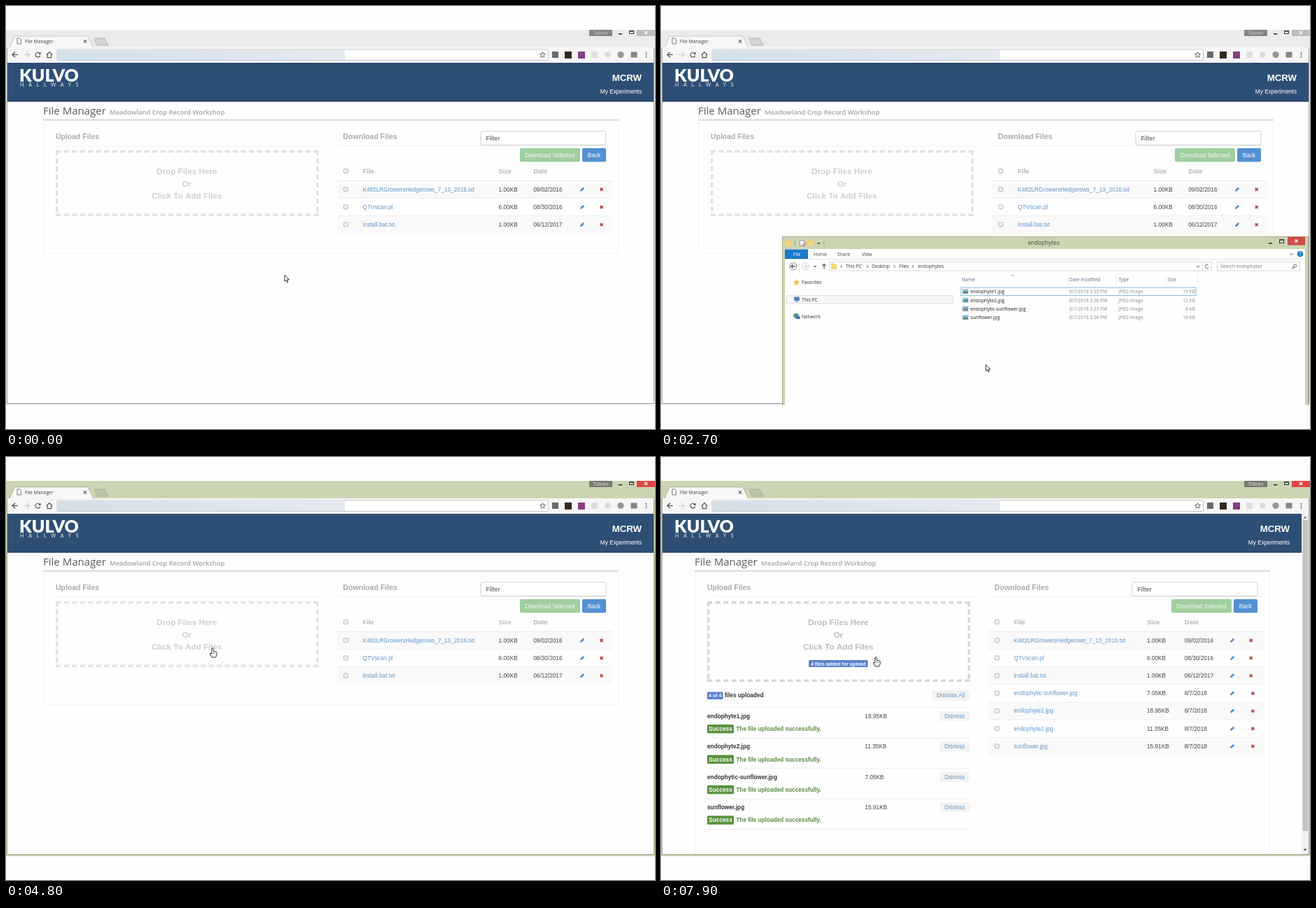
Recreate the animation shown at these times as an HTML page with a canvas. Size 927 by 604 pixels, loop 8000 ms.

```html
<!DOCTYPE html>
<html lang="en">
<head>
<meta charset="utf-8">
<title>File Manager</title>
<style>
html, body { margin: 0; width: 100%; height: 100%; overflow: hidden; background: #fefefe; }
canvas { display: block; }
</style>
</head>
<body>
<canvas id="stage" width="927" height="604"></canvas>
<script>
const g = document.getElementById('stage').getContext('2d');
const ARIAL = '"Liberation Sans", Arial, sans-serif';
const OPEN = '"Open Sans", sans-serif';
const LATO = 'Lato, sans-serif';
const LOOP = 8000, STEP = 100;
const OPENED = 1300, DRAG = 3700, DROP = 4600, LISTED = 5500, DONE = 6100;
const LINK = '#6297ca', GREEN = '#ccd5b3', BADGE = '#5c80d2';

// Pointer path: time, x, y
const PATH = [
  [200, 398, 384], [800, 387, 562], [900, 387, 580], [1900, 440, 580],
  [2600, 464, 512], [2800, 464, 512], [3200, 457.5, 411], [3400, 456, 405],
  [3600, 462, 412], [DRAG, 462, 412], [4300, 322, 297], [DROP, 295, 273],
  [6400, 295, 273], [7200, 307, 286]
];

const FILES = [
  ['K482LRGrowersHedgerows_7_13_2016.txt', '1.00KB', '09/02/2016'],
  ['QTVscan.pl', '6.00KB', '08/30/2016'],
  ['install.bat.txt', '1.00KB', '06/12/2017'],
  ['endophytic-sunflower.jpg', '7.05KB', '8/7/2018'],
  ['endophyte1.jpg', '18.95KB', '8/7/2018'],
  ['endophyte2.jpg', '11.35KB', '8/7/2018'],
  ['sunflower.jpg', '15.91KB', '8/7/2018']
];
const UPLOADS = [FILES[4], FILES[5], FILES[3], FILES[6]];
const FOLDER = [
  ['endophyte1.jpg', 35, 19], ['endophyte2.jpg', 36, 12],
  ['endophytic-sunflower.jpg', 37, 8], ['sunflower.jpg', 36, 16]
];

function rect(x, y, w, h, fill, stroke) {
  if (fill) { g.fillStyle = fill; g.fillRect(x, y, w, h); }
  if (stroke) {
    g.strokeStyle = stroke; g.lineWidth = 1;
    g.strokeRect(x + .5, y + .5, w - 1, h - 1);
  }
}
function round(x, y, w, h, r, fill, stroke) {
  g.beginPath(); g.roundRect(x, y, w, h, r);
  if (fill) { g.fillStyle = fill; g.fill(); }
  if (stroke) { g.strokeStyle = stroke; g.lineWidth = 1; g.stroke(); }
}
function poly(pts, fill, stroke, width = 1) {
  g.beginPath();
  for (let i = 0; i < pts.length; i += 2) g.lineTo(pts[i], pts[i + 1]);
  if (fill) { g.closePath(); g.fillStyle = fill; g.fill(); }
  if (stroke) { g.strokeStyle = stroke; g.lineWidth = width; g.stroke(); }
}
function disc(x, y, r, fill, stroke, width = 1, a = 0, b = 7) {
  g.beginPath(); g.arc(x, y, r, a, b);
  if (fill) { g.fillStyle = fill; g.fill(); }
  if (stroke) { g.strokeStyle = stroke; g.lineWidth = width; g.stroke(); }
}
function cross(x, y, r, color, width) {
  poly([x - r, y - r, x + r, y + r], null, color, width);
  poly([x + r, y - r, x - r, y + r], null, color, width);
}
// y is the middle of the capitals
function text(s, x, y, size, color, font = ARIAL, weight = 400, align = 'left') {
  g.font = `${weight} ${size}px ${font}`;
  g.textAlign = align;
  g.fillStyle = color;
  g.fillText(s, x, y + size * .36);
}
const bold = (s, x, y, size, color, align) => text(s, x, y, size, color, ARIAL, 700, align);
const ui = (s, x, y, color = '#333', align = 'left') => text(s, x, y, 6.7, color, OPEN, 400, align);

function badge(s, x, y, w, h, size, color) {
  round(x, y - h / 2, w, h, 1.5, color);
  bold(s, x + w / 2, y, size, '#fff', 'center');
}
function button(s, x, y, w, h, fill, color) {
  round(x, y, w, h, 2, fill);
  text(s, x + w / 2, y + h / 2, 8.25, color, ARIAL, 400, 'center');
}

function drawBrowser(active) {
  const bar = active ? GREEN : '#ebebeb';
  rect(0, 34, 927, 536, bar);
  poly([5, 60, 12, 43, 117, 43, 125, 60], '#f7f7f7', active ? '#a3aa90' : '#bbb', .8);
  poly([126, 46, 141, 46, 146, 56, 130, 56], active ? '#bcc4a5' : '#d5d5d5', '#a9a9a9', .8);
  rect(2, 59, 923, 22, '#f6f6f6');
  poly([16, 46, 19.5, 46, 21.5, 48.2, 21.5, 54, 16, 54, 16, 46], '#fff', '#666', .9);
  text('File Manager', 27, 50.5, 6.8, '#444', OPEN);
  cross(113, 50.5, 2.1, '#555', 1.1);

  rect(833, 34, 33, 9, active ? '#777c6c' : '#858585');
  text('Tobren', 849.5, 38.3, 6.6, active ? '#eee' : '#ccc', OPEN, 400, 'center');
  rect(875, 39, 5, 1.6, '#333');
  rect(890, 35, 7, 5, null, '#333');
  rect(890, 35, 7, 1.6, '#333');
  rect(901, 34, 26, 9, active ? '#df4746' : '#bdbdbd');
  cross(914, 38, 2, '#fff', 1.2);

  const dark = '#505050', pale = '#cfcfcf';
  for (const [x, d, c] of [[13, -1, dark], [29.5, 1, pale]]) {
    poly([x - 4, 69.5, x + 4, 69.5], null, c, 1.2);
    poly([x, 65.8, x + 4 * d, 69.5, x, 73.2], null, c, 1.2);
  }
  disc(45.5, 69.7, 3.4, null, dark, 1.2, .3, 5.6);
  poly([49.6, 65.4, 49.6, 69, 46, 69], dark);
  poly([57.8, 70, 62, 65.6, 66.2, 70], null, dark, 1.2);
  poly([59.2, 69.5, 59.2, 73.6, 64.8, 73.6, 64.8, 69.5], null, dark, 1.2);

  round(73, 62, 701.5, 15.5, 1, '#fff', '#c9c9c9');
  const blur = g.createLinearGradient(73, 0, 484, 0);
  blur.addColorStop(0, '#d3e0ea');
  blur.addColorStop(.5, '#dbe4ed');
  blur.addColorStop(1, '#e5ebf1');
  rect(74, 63, 410, 14, blur);
  const star = [];
  for (let i = 0; i <= 10; i++) {
    const r = i % 2 ? 1.8 : 4.2, a = i * Math.PI / 5;
    star.push(766.5 + r * Math.sin(a), 69.8 - r * Math.cos(a));
  }
  poly(star, null, '#555', .9);
  rect(780, 65, 9, 9, '#666b70');
  rect(798, 65, 10, 10, '#34291f');
  rect(817, 65, 10, 10, '#82407f');
  rect(836, 65, 9, 9, '#dedede');
  disc(859.5, 69.5, 4.3, '#dcdcdc');
  disc(878, 69.5, 4.6, '#969696');
  rect(892.5, 65.5, 9, 8, '#858585');
  for (let i = -1; i < 2; i++) disc(914.5, 69.7 + i * 3, .9, dark);

  rect(2, 80, 923, 487, '#fefefe');
  const edge = active ? '#9ba389' : '#a0a0a0';
  rect(1, 60, 1, 508, edge);
  rect(1, 567, 925, 1, edge);
  rect(925, 60, 1, 508, edge);
}

function drawDropZone(x, h, strong) {
  const color = strong ? '#d6d6d6' : '#e2e2e2', ink = strong ? '#bcbcbc' : '#cfcfcf';
  const r = x + 375.5, b = 206 + h;
  g.setLineDash([7.3, 4.2]);
  for (const y of [207.7, b - 1.7]) poly([x, y, r, y], null, color, 3.4);
  for (const e of [x + 1.7, r - 1.7]) poly([e, 206, e, b], null, color, 3.4);
  g.setLineDash([]);
  ['Drop Files Here', 'Or', 'Click To Add Files'].forEach((s, i) =>
    bold(s, x + 187.3, 236 + i * 17.6, 11.7, ink, 'center'));
}

function drawTable(listed) {
  const [left, box, name, size, date, pen] = listed
    ? [467.5, 480, 504, 694, 747.7, 816] : [473, 485.3, 509.5, 703.6, 753.2, 823];
  const check = y => round(box - 3, y - 3, 6, 6, 1.2, '#f1f1f1', '#b5b5b5');
  check(235.6);
  bold('File', name, 236, 9.5, '#b6b6b6');
  bold('Size', size, 236, 9.2, '#b6b6b6');
  bold('Date', date, 236, 9.4, '#b6b6b6');
  FILES.slice(0, listed ? 7 : 3).forEach(([file, kb, day], i) => {
    const y = 261.7 + i * 25.2;
    rect(left, y - 12.6, 393, 25.2, i % 2 ? '#fefefe' : '#f9f9f9');
    rect(left, y - 12.9, 393, i ? .7 : 1.3, '#ececec');
    check(y);
    text(file, name, y, 8.25, LINK);
    text(kb, size, y, 8.25, '#444');
    text(day, date, y, 8.25, '#444');
    poly([pen - 3.2, y + 3.2, pen - 2.4, y + .5, pen + 1.2, y - 3, pen + 3.2, y - 1, pen - .5, y + 2.6], '#5a92d2');
    cross(listed ? (i < 3 ? 842.7 : 845.3) : 850.6, y + .2, 1.9, '#b9483f', 1.8);
  });
}

function drawUploads(done) {
  badge('4 files added for upload', 211, 295, 84.5, 10, 7, BADGE);
  badge('4 of 4', 66, 340.7, 22.5, 10.5, 7.1, BADGE);
  bold('files uploaded', 91, 340.5, 8.25, '#333');
  button('Dismiss All', 387, 333, 54, 15, '#f3f3f3', LINK);
  rect(66, 357, 375, .8, '#eaeaea');
  UPLOADS.forEach(([file, kb], i) => {
    const y = 370 + i * (done ? 43.4 : 67);
    bold(file, 66, y, 8.25, '#333');
    text(kb, 291.3, y, 8.25, '#444');
    if (done) {
      button('Dismiss', 398, y - 7, 43, 14, '#f3f3f3', LINK);
      badge('Success', 66, y + 18.3, 38, 12.5, 8.25, '#5a9140');
      bold('The file uploaded successfully.', 107.3, y + 18.3, 8.25, '#5c8d48');
      rect(66, y + 31, 375, .8, '#eaeaea');
    } else {
      round(66, y + 10.5, 375, 11.5, 2, '#f3f3f3', '#ededed');
      badge('Processing', 66, y + 41.7, 48.5, 12.5, 8.25, BADGE);
      bold('The file has uploaded and is being processed.', 118.3, y + 41.7, 8.25, '#333');
      rect(66, y + 54, 375, .8, '#eaeaea');
    }
  });
}

function drawPage(listed, done) {
  g.save();
  g.beginPath(); g.rect(2, 80, 923, 487); g.clip();
  const dx = listed ? -5 : 0, right = listed ? 898 : 908;
  rect(2, 81, 923, 55.5, '#2e4f75');
  rect(2, 135.5, 923, 1, '#233f60');
  text('KULVO', 19, 99, 25, '#fff', LATO, 900);
  g.letterSpacing = '6.8px';
  text('HALLWAYS', 20, 112.7, 7, '#e8edf3', LATO);
  g.letterSpacing = '0px';
  bold('MCRW', right, 102.7, 13.2, '#fff', 'right');
  text('My Experiments', right, 121.8, 8.25, '#fff', ARIAL, 400, 'right');

  text('File Manager', 53 + dx, 150, 15, '#5c5c63', OPEN, 500);
  text('Meadowland Crop Record Workshop', 148 + dx, 152, 9.4, '#a3a3a3', OPEN, 600);
  const bottom = listed ? 580 : 354.5;
  rect(53 + dx, 163, 822, bottom - 163, null, '#f3f3f3');
  rect(53 + dx, 161.5, 822, 2.5, '#dedede');
  bold('Upload Files', 71 + dx, 185.8, 10.45, '#ababab');
  rect(71 + dx, 199, 383, .8, '#eee');
  bold('Download Files', 481.3 + dx, 185.8, 10.6, '#ababab');
  rect(473 + dx, 199, 393, .8, '#eee');
  round(678 + dx, 178.8, 179, 19.7, 2, '#fff', '#d2d2d2');
  bold('Filter', 685.5 + dx, 188.8, 8.25, '#777');
  button('Download Selected', 734 + dx, 203, 86, 19.5, '#a1cfa0', '#f3faf3');
  button('Back', 823 + dx, 203, 34, 19.5, '#5590d4', '#fff');

  drawDropZone(71 + dx, listed ? 115 : 94, listed);
  drawTable(listed);
  if (listed) {
    drawUploads(done);
    rect(915, 81, 10, 486, '#f1f1f1');
    rect(916.5, 90, 7.5, done ? 444 : 374, '#c2c2c2');
    poly([917.5, 87.5, 922.5, 87.5, 920, 84.5], '#777');
    poly([917.5, 559.5, 922.5, 559.5, 920, 562.5], '#555');
  }
  g.restore();
}

function folder(x, y) {
  rect(x - 4, y - 4, 4, 3, '#e3bd55');
  rect(x - 4, y - 3, 8, 7.5, '#f3d778');
}

function drawExplorer(pick, marquee) {
  const some = pick.some(Boolean), mid = some ? 611 : 546.5;
  rect(173, 329, 752, 250, GREEN, '#a4ac8d');
  rect(177, 347, 743, 230, '#fefefe');
  folder(182, 338); folder(214, 338);
  rect(191, 335, .8, 7, '#999');
  rect(198, 334, 6.5, 9, '#fff', '#999');
  poly([202, 340, 204, 342.5, 207, 337.5], null, '#d76b55', 1.2);
  poly([223, 338, 227.5, 338, 225.2, 340.5], '#444');
  rect(232.5, 335, .8, 7, '#999');
  text('endophytes', mid, 338.5, 8.2, '#454a3a', OPEN, 400, 'center');
  rect(868, 338, 5, 1.6, '#333');
  rect(883, 333, 7, 6, null, '#333');
  rect(883, 333, 7, 1.6, '#333');
  rect(895, 329.5, 25, 12, '#cb4d4b');
  cross(907.5, 335.5, 2, '#fff', 1.2);

  rect(177, 347.5, 33, 13.5, '#1979ca');
  ui('File', 194, 354.5, '#fff', 'center');
  [['Home', 227.5], ['Share', 261], ['View', 294]].forEach(([s, x]) => ui(s, x, 354.8, '#444', 'center'));
  rect(177, 361, 743, .8, '#dcdcdc');
  if (some) {
    rect(312, 331, 46, 16, '#f3eb83');
    ui('Picture Tools', 335, 339.5, '#736a25', 'center');
    ui('Manage', 335, 354.8, '#444', 'center');
  }
  poly([898, 353, 900.5, 355.5, 903, 353], null, '#666');
  disc(913, 354, 4.2, '#1979ca');
  text('?', 913, 354, 6.5, '#fff', OPEN, 700, 'center');

  disc(188.8, 371.8, 5, null, '#777', .9);
  poly([192, 371.8, 186, 371.8], null, '#444', 1.2);
  poly([188.6, 369.2, 186, 371.8, 188.6, 374.4], null, '#444', 1.2);
  disc(206, 371.8, 5, null, '#ccc', .9);
  poly([203, 371.8, 209, 371.8], null, '#ccc', 1.2);
  poly([206.4, 369.4, 208.8, 371.8, 206.4, 374.2], null, '#ccc');
  poly([218, 371, 222, 371, 220, 373.3], '#555');
  poly([233, 375.5, 233, 368.5], null, '#555', 1.2);
  poly([230.5, 371, 233, 368.3, 235.5, 371], null, '#555', 1.2);
  rect(240, 365, 547, 13.5, '#fff', '#dadada');
  rect(773, 365, .8, 13, '#dadada');
  folder(247, 371.5);
  [['This PC', 264], ['Desktop', 301], ['Files', 340], ['endophytes', 367]].forEach(([s, x], i) => {
    ui(s, x, 372);
    const c = [257.5, 295, 333.5, 360][i];
    poly([c - 1, 370, c + 1, 372, c - 1, 374], null, '#555', .9);
  });
  poly([765, 371, 767, 373, 769, 371], null, '#555');
  disc(780, 372, 2.6, null, '#555', .9, .3, 5.4);
  rect(794, 365, 119, 13.5, '#fff', '#dadada');
  ui('Search endophytes', 799, 372, '#777');
  disc(905.5, 371, 2.1, null, '#555', .9);
  poly([904, 372.6, 901.5, 375], null, '#555', 1.2);

  rect(179, 413, 239, 12.5, '#f7f7f7', '#e0e0e0');
  poly([193.5, 389.5, 195, 393, 198.5, 393.2, 195.7, 395.3, 197, 399, 193.5, 396.8, 190, 399, 191.3, 395.3, 188.5, 393.2, 192, 393], '#f0b94a');
  rect(190, 415.5, 8, 5.5, '#3f78c4', '#7d95b5');
  rect(192, 421.5, 4, 1.4, '#8a96a8');
  disc(193, 442.3, 3.6, '#4a9c88');
  rect(193, 443, 5.5, 4, '#3f78c4');
  [['Favorites', 394.6], ['This PC', 419.3], ['Network', 444]].forEach(([s, y]) => ui(s, 201, y));

  [['Name', 429.5], ['Date modified', 583], ['Type', 653.5], ['Size', 724]].forEach(([s, x]) => ui(s, x, 390.8, '#5d6b85'));
  for (const x of [580, 650, 721, 766]) rect(x, 384, .7, 14, '#e6e6e6');
  poly([500, 385.5, 502, 383.8, 504, 385.5], null, '#777', .8);

  FOLDER.forEach(([file, min, kb], i) => {
    const y = 407.8 + i * 12.3;
    if (pick[i]) rect(428, y - 6.2, 336.5, 12.4, i ? '#cde9f3' : '#d3e9f8', '#73bbdf');
    else if (!i) rect(428, y - 6.2, 336.5, 12.4, null, '#82bfe0');
    rect(430.5, y - 3.5, 8.5, 7, '#fff', '#9aa8b3');
    rect(431.5, y - 2.3, 6.5, 2.4, '#6db0dc');
    rect(431.5, y, 6.5, 2.3, '#4d7c76');
    ui(file, 442, y, '#222');
    ui(`8/7/2018 3:${min} PM`, 583, y, '#868d94');
    ui('JPEG image', 653.5, y, '#868d94');
    ui(kb + ' KB', 763, y, '#868d94', 'right');
  });
  if (marquee) {
    const [x, y] = marquee;
    rect(x, y, Math.max(1.5, 464 - x), 512 - y, 'rgba(51,140,225,.5)', '#4c97dc');
  }
}

function drawDragged(x, y) {
  g.save();
  g.translate(x, y);
  rect(-25, -51, 61, 62, 'rgba(222,238,246,.85)', '#d3e4ec');
  rect(-8, -42, 32, 40, '#6e7b4c');
  rect(-18, -37, 48, 40, '#b0723f');
  rect(-21, -36, 46, 41, '#24391f');
  for (let i = 0; i < 5; i++)
    poly([-18 + i * 9, 4, -12 + i * 9, -12 - i % 2 * 9, -5 + i * 7, -20, -6 + i * 7, -8], i % 2 ? '#47743a' : '#355b2b');
  disc(-8, -27, 9, '#ba4830');
  disc(-5, -30, 5, '#d4644a');
  rect(-1, -26.5, 11.5, 12, '#2d6fc4', '#dbe8f5');
  text('4', 4.7, -20.5, 7.5, '#fff', OPEN, 700, 'center');
  if (y < 329) {
    rect(11, 10.5, 34.5, 12.5, '#fefefe', '#8d8d8d');
    poly([14, 17, 20, 17], null, '#2664b5', 2);
    poly([17.5, 13.7, 21, 17, 17.5, 20.3], '#2664b5');
    ui('Move', 23.5, 17, '#345c9c');
  }
  g.restore();
}

function drawPointer(x, y, hand) {
  g.save();
  g.translate(x, y);
  g.lineJoin = 'round';
  if (hand) {
    poly([-1.2, .5, 0, -.6, 1.2, .5, 1.2, 4.3, 4.5, 4.8, 6, 6, 6, 9.5, 4.6, 13, -.8, 13, -3.8, 8.2, -3.3, 7, -1.2, 8.2, -1.2, .5], '#fff', '#222', .95);
    for (const i of [1.4, 3.2]) poly([i, 6, i, 8], null, '#444', .7);
  } else {
    poly([0, 0, 0, 9.2, 2.1, 7.3, 3.6, 10.6, 5, 10, 3.6, 6.8, 6.3, 6.6, 0, 0], '#fff', '#222', .9);
  }
  g.restore();
}

function pointerAt(t) {
  const i = PATH.findIndex(p => p[0] > t);
  if (i === 0) return PATH[0].slice(1);
  if (i < 0) return PATH[PATH.length - 1].slice(1);
  const [t0, x0, y0] = PATH[i - 1], [t1, x1, y1] = PATH[i];
  const k = (t - t0) / (t1 - t0), e = k * k * (3 - 2 * k);
  return [x0 + (x1 - x0) * e, y0 + (y1 - y0) * e];
}

function draw(t) {
  const [x, y] = pointerAt(t);
  rect(0, 0, 927, 604, '#fefefe');
  g.save();
  g.beginPath(); g.rect(0, 34, 927, 536); g.clip();
  drawBrowser(t >= DROP);
  drawPage(t >= LISTED, t >= DONE);
  if (t >= OPENED && t < DROP) {
    const k = Math.min(1, (t - OPENED + STEP) / 300), s = .9 + .1 * k;
    const selecting = t > 2800 && t < 3400;
    const pick = FOLDER.map((f, i) => t >= 3400 || selecting && y < 414 + i * 12.3);
    g.save();
    g.globalAlpha = k;
    g.translate(549, 570); g.scale(s, s); g.translate(-549, -570);
    drawExplorer(pick, selecting && [x, y]);
    g.restore();
  }
  if (t > DRAG && t < DROP) drawDragged(x, y);
  drawPointer(x, y, t >= DROP);
  g.restore();
}

let start;
function tick(now) {
  start ??= now;
  draw(Math.floor((now - start) % LOOP / STEP) * STEP);
  requestAnimationFrame(tick);
}
requestAnimationFrame(tick);
</script>
</body>
</html>
```
